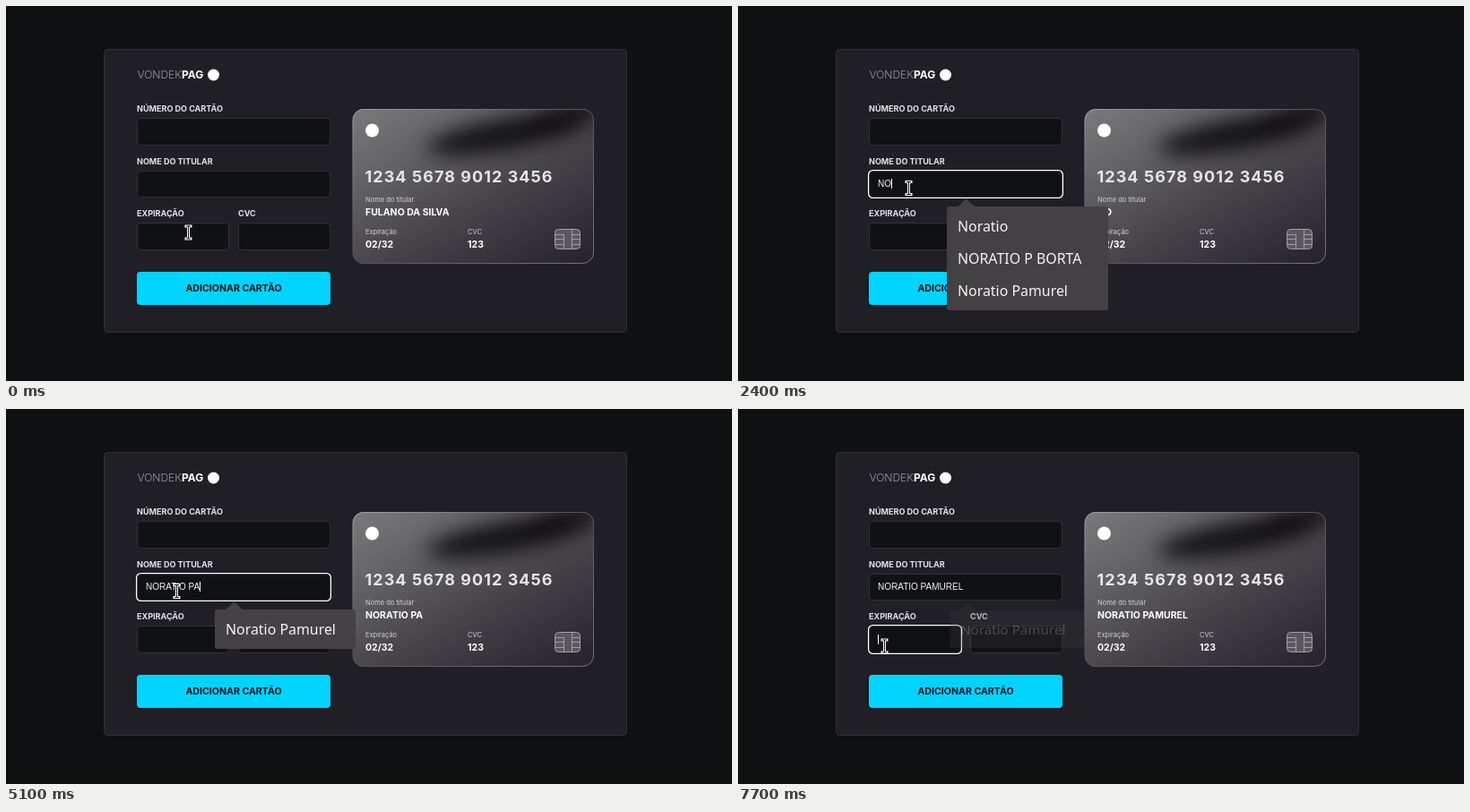
An HTML page for the animation above (8000 ms loop, 810 by 419 pixels).

```html
<!DOCTYPE html>
<html lang="pt-BR">
<head>
<meta charset="utf-8">
<title>Formulário de cartão</title>
<style>
  html, body { margin: 0; width: 100%; height: 100%; overflow: hidden; background: #0f1011; }
  svg { display: block; width: 100%; height: 100%; }
  text { white-space: pre; font-family: Inter, sans-serif; fill: #fff; }
  .logo { font-size: 12px; font-weight: 300; fill: #98979c; }
  .logo tspan { font-weight: 700; fill: #fff; }
  .label { font-size: 9.05px; font-weight: 700; fill: #e1e1e6; }
  .field { fill: #101113; stroke: #323138; }
  .typed { font: 10px "Liberation Sans", Arial, sans-serif; fill: #f2f2f4; }
  .button { font-size: 10.6px; font-weight: 700; fill: #15141b; text-anchor: middle; }
  .number { font-size: 18px; font-weight: 700; letter-spacing: 1.05px; fill: #e6e5e9; }
  .hint { font-size: 7.5px; fill: #d2d1d6; }
  .value { font-size: 10.5px; font-weight: 700; }
  #popup text { font: 15.9px "Noto Sans", sans-serif; fill: #f4f4f4; }
</style>
</head>
<body>
<svg viewBox="0 0 810 419">
  <defs>
    <linearGradient id="metal" x1="0" y1="0" x2=".9" y2="1">
      <stop offset="0" stop-color="#7a797b"/>
      <stop offset=".3" stop-color="#616063"/>
      <stop offset=".6" stop-color="#464449"/>
      <stop offset="1" stop-color="#28262c"/>
    </linearGradient>
    <linearGradient id="edge" x1="0" y1="0" x2="1" y2="1">
      <stop offset="0" stop-color="#a3a1a7"/>
      <stop offset=".45" stop-color="#55525b"/>
      <stop offset="1" stop-color="#77717e"/>
    </linearGradient>
    <filter id="blur" x="-50%" y="-150%" width="200%" height="400%" color-interpolation-filters="sRGB">
      <feGaussianBlur stdDeviation="11"/>
    </filter>
    <clipPath id="cardShape"><rect x="387" y="115" width="269" height="173" rx="12"/></clipPath>
  </defs>

  <rect x="109.5" y="48.5" width="583" height="316" rx="4" fill="#201f25" stroke="#323138"/>
  <text class="logo" x="146.5" y="81">VONDEK<tspan>PAG</tspan></text>
  <circle cx="231.5" cy="77" r="6.5" fill="#fff"/>

  <text class="label" x="146" y="118">NÚMERO DO CARTÃO</text>
  <rect class="field" x="146.5" y="125.5" width="215" height="30" rx="4"/>
  <text class="label" x="146" y="177">NOME DO TITULAR</text>
  <rect class="field" x="146.5" y="184.5" width="215" height="29" rx="4"/>
  <text class="label" x="146" y="235">EXPIRAÇÃO</text>
  <rect class="field" x="146.5" y="242.5" width="102" height="30" rx="4"/>
  <text class="label" x="259" y="235">CVC</text>
  <rect class="field" x="259.5" y="242.5" width="102" height="30" rx="4"/>
  <rect id="ring" x="145.6" rx="5" fill="#101113" stroke="#fff" stroke-width="1.3"/>
  <rect x="146" y="297" width="216" height="37" rx="4" fill="#00d4ff"/>
  <text class="button" x="254" y="319">ADICIONAR CARTÃO</text>

  <g clip-path="url(#cardShape)">
    <rect x="387" y="115" width="269" height="173" fill="url(#metal)"/>
    <g filter="url(#blur)" fill="#0c0b0d">
      <ellipse cx="560" cy="143" rx="92" ry="17" transform="rotate(-10 560 143)" opacity=".9"/>
      <ellipse cx="635" cy="118" rx="65" ry="14" transform="rotate(-14 635 118)" opacity=".75"/>
    </g>
  </g>
  <rect x="387" y="115.5" width="268.5" height="172" rx="12" fill="none" stroke="url(#edge)"/>
  <circle cx="408.5" cy="139" r="7.5" fill="#fff"/>
  <text class="number" x="400.5" y="197">1234 5678 9012 3456</text>
  <text class="hint" x="401" y="219">Nome do titular</text>
  <text class="value" id="holder" x="401" y="234"></text>
  <text class="hint" x="401" y="255">Expiração</text>
  <text class="value" x="401" y="270">02/32</text>
  <text class="hint" x="515" y="255">CVC</text>
  <text class="value" x="515" y="270">123</text>
  <g fill="none" stroke="#a09fa3">
    <rect x="612.5" y="249.5" width="28" height="22" rx="4" fill="#5a585c"/>
    <path d="M612.5 255.5h10v16M612.5 260.5h10M612.5 266.5h10M640.5 255.5h-9M631.5 249.5v22M640.5 260.5h-9M640.5 266.5h-9"/>
  </g>

  <text class="typed" id="typed" x="156" y="202"></text>
  <rect id="caret" width="1" height="11" fill="#fff"/>

  <g id="popup">
    <path d="M244 225L254.5 215.5L265 225Z" fill="#434143"/>
    <rect id="panel" x="233" y="224" rx="3" fill="#434143"/>
    <text x="245" y="252"></text>
    <text x="245" y="288"></text>
    <text x="245" y="324"></text>
  </g>

  <g id="mouse" fill="none">
    <path id="beam" d="M-2.5 -7H2.5M0 -7V7M-2.5 7H2.5" stroke="#fff" stroke-width="3" stroke-linecap="square"/>
    <path d="M-2.5 -7H2.5M0 -7V7M-2.5 7H2.5" stroke="#111"/>
  </g>
</svg>
<script>
const LOOP = 8000;
const NAME = 'NORATIO PAMUREL';
const FIRST = 'Noratio', FULL = 'Noratio Pamurel', UPPER = 'NORATIO P BORTA';
const OPEN = 900, LEAVE = 7600;
const keyTimes = [1500, 2400, 2600, 4100, 4300, 4400, 4600, 4800,
                  5000, 5100, 5300, 5400, 5500, 6100, 6500];

// [start time, x, y]
const mousePath = [
  [0, 203.5, 253], [400, 212, 262], [600, 190.5, 203.5], [7000, 208, 213.5],
  [7200, 204, 228], [7300, 195, 243], [7400, 182, 256], [7500, 169, 263], [7600, 163.5, 265]
];
// [start time, suggestions]
const suggestions = [
  [0, []],
  [OPEN, [FIRST, FULL, UPPER]],
  [1600, [FIRST, UPPER, FULL]],
  [4800, [UPPER, FULL]],
  [5100, [FULL]]
];

const byId = id => document.getElementById(id);
const set = (el, attrs) => Object.entries(attrs).forEach(([k, v]) => el.setAttribute(k, v));
const current = (steps, t) => steps.findLast(step => step[0] <= t);
const within = (t, from, to) => t >= from && t < to;
const visibility = on => on ? 'visible' : 'hidden';

const typed = byId('typed'), holder = byId('holder'), caret = byId('caret');
const ring = byId('ring'), popup = byId('popup'), panel = byId('panel'), mouse = byId('mouse');
const rows = popup.querySelectorAll('text');

function drawPopup(t) {
  const items = current(suggestions, t)[1];
  const width = items.length > 1 ? 180 : 157;
  const height = 8 + 36 * items.length;
  set(panel, { width, height });
  rows.forEach((row, i) => row.textContent = items[i] ?? '');

  const fade = t < LEAVE ? 0 : t < LEAVE + 100 ? 0.4 : 1;
  const scale = 1 - 0.045 * fade;
  const cx = 233 + width / 2, cy = 224 + height / 2;
  set(popup, {
    visibility: visibility(items.length),
    opacity: 1 - 0.76 * fade,
    transform: `translate(${cx} ${cy}) scale(${scale}) translate(${-cx} ${-cy})`
  });
}

function drawFocus(t, text) {
  const onDate = t >= LEAVE;
  set(ring, {
    y: onDate ? 241.6 : 183.6,
    width: onDate ? 103.8 : 216.8,
    height: onDate ? 31.8 : 30.8,
    visibility: visibility(t >= OPEN)
  });

  const blinkedOff = within(t, 3600, 3800) || within(t, 6300, 6500);
  const offset = onDate || !text ? 0 : typed.getComputedTextLength();
  set(caret, {
    x: Math.floor(156 + offset),
    y: onDate ? 252 : 193,
    visibility: visibility(t >= OPEN && !blinkedOff)
  });
}

function draw(t) {
  const text = NAME.slice(0, keyTimes.filter(k => k <= t).length);
  typed.textContent = text;
  holder.textContent = text || 'FULANO DA SILVA';

  drawFocus(t, text);
  drawPopup(t);
  const [, x, y] = current(mousePath, t);
  set(mouse, { transform: `translate(${x} ${y})` });
}

const start = performance.now();
function tick() {
  draw((performance.now() - start) % LOOP);
  requestAnimationFrame(tick);
}
tick();
</script>
</body>
</html>
```
